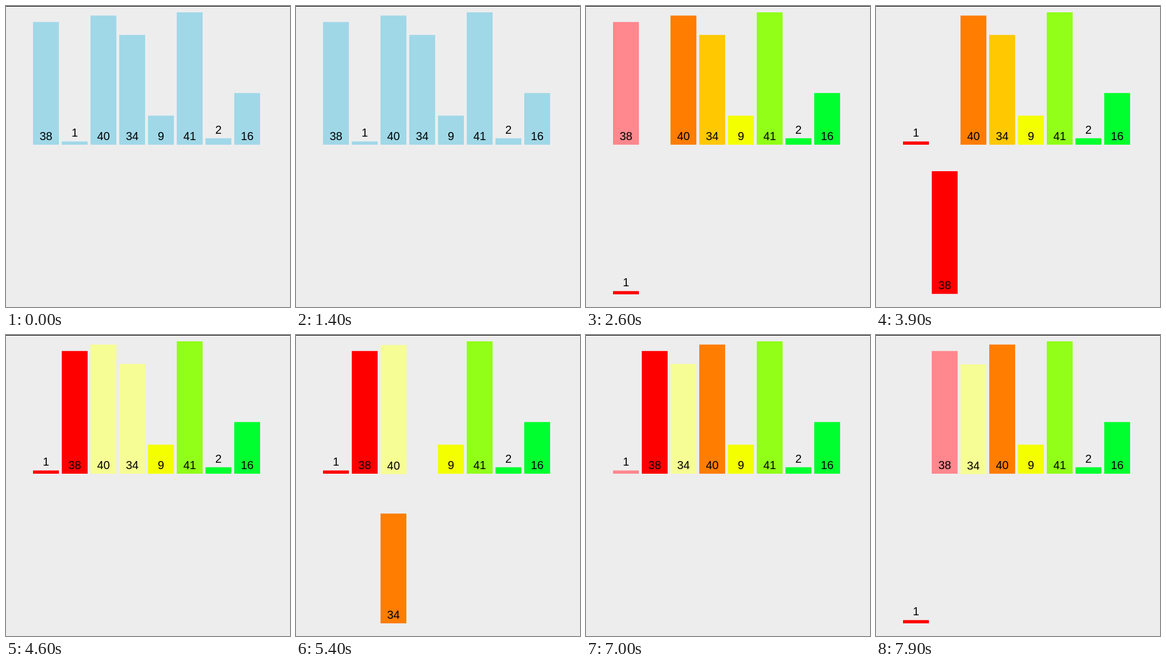
Animation, 494 px wide and 523 px high, one loop 8000 ms. Source, as an HTML page with a canvas:

```html
<!DOCTYPE html>
<html lang="en">
<head>
<meta charset="utf-8">
<title>Merge sort</title>
<style>
html, body { margin: 0; width: 100%; height: 100%; overflow: hidden; background: #ededee; }
canvas { display: block; }
</style>
</head>
<body>
<canvas id="stage" width="494" height="523"></canvas>
<script>
const ctx = document.getElementById('stage').getContext('2d');
const LOOP = 8000, TICK = 100, STEP = 500, FIRST = 1380, MOVE = 220;
const BASE = 241, DROP = 260, UNIT = 5.61, BAR = 45, PITCH = 50, LEFT = 47;

const BLUE = [160, 216, 232], RED = [255, 0, 0], ORANGE = [255, 125, 0],
      PINK = [255, 135, 141], PALE = [246, 253, 148], GREEN = [0, 255, 47];
const values = [38, 1, 40, 34, 9, 41, 2, 16];
const groups = [RED, RED, ORANGE, [255, 200, 0], [244, 255, 0], [145, 255, 23], GREEN, GREEN];

// Each bar has a list of changes: start time, duration and the new properties.
const changes = values.map(() => []);
const change = (step, value, to, start = FIRST + step * STEP, time = MOVE) =>
  changes[values.indexOf(value)].push({ start, time, to });
const mark = (step, value, color) => change(step, value, { color });
const lower = (step, value, slot, color) => change(step, value, { slot, row: 1, color });
const raise = (step, value, start) => change(step, value, { row: 0 }, start);

values.forEach((v, i) => mark(0, v, groups[i]));
mark(1, 38, PINK);
mark(1, 1, PINK);
lower(2, 1, 0, RED);
lower(3, 38, 1, RED);
raise(4, 1);
raise(5, 38);
mark(6, 40, PALE);
mark(6, 34, PALE);
lower(7, 34, 2, ORANGE);
lower(8, 40, 3, ORANGE);
raise(9, 34, 5853);
raise(10, 40);
change(11, 1, { color: PINK }, 6930, 60);
change(11, 34, { color: PALE }, 6930, 60);
lower(12, 1, 0, RED);
mark(12, 38, PINK);
lower(13, 34, 1, ORANGE);

const ease = p => p < 0.5 ? 4 * p ** 3 : 1 - 4 * (1 - p) ** 3;
const mix = (a, b, p) => Array.isArray(a) ? a.map((v, i) => mix(v, b[i], p)) : a + (b - a) * p;

function barAt(i, t) {
  const bar = { slot: i, row: 0, color: BLUE };
  for (const { start, time, to } of changes[i]) {
    if (t <= start) break;
    const p = ease(Math.min(1, (t - start) / time));
    for (const key in to) bar[key] = mix(bar[key], to[key], p);
  }
  return bar;
}

function draw(now) {
  const t = Math.floor(now % LOOP / TICK) * TICK;
  ctx.fillStyle = '#ededee';
  ctx.fillRect(0, 0, 494, 523);
  ctx.fillStyle = '#000';
  ctx.fillRect(0, 0, 494, 1);
  ctx.font = '20px "Liberation Sans", Arial, sans-serif';
  ctx.textAlign = 'center';
  values.forEach((value, i) => {
    const { slot, row, color } = barAt(i, t);
    const x = LEFT + slot * PITCH, bottom = BASE + row * DROP, height = value * UNIT;
    ctx.fillStyle = `rgb(${color.map(Math.round)})`;
    ctx.fillRect(x, bottom - height, BAR, height);
    ctx.fillStyle = '#000';
    ctx.fillText(value, x + BAR / 2, (height < 20 ? bottom - height : bottom) - 8);
  });
}

const begin = performance.now();
function tick() {
  draw(performance.now() - begin);
  requestAnimationFrame(tick);
}
tick();
</script>
</body>
</html>
```
